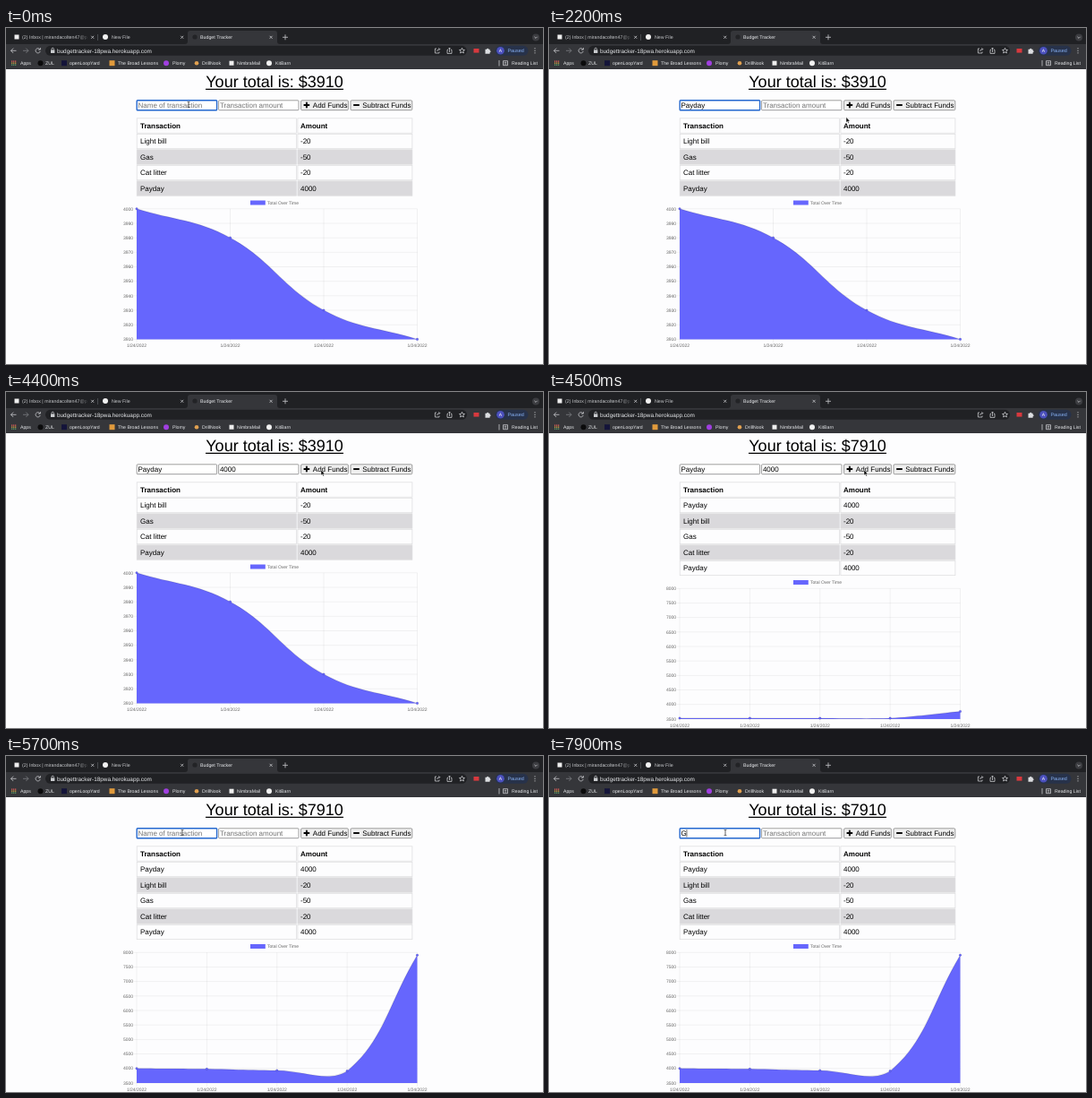
An HTML page for the animation above (8 s loop, 600 px wide and 375 px high).

```html
<!DOCTYPE html>
<html lang="en">
<head>
<meta charset="utf-8">
<title>Budget Tracker</title>
<style>
  html, body { margin: 0; width: 100%; height: 100%; overflow: hidden; background: #fdfdfe; }
  svg { display: block; width: 100vw; height: 100vh; }
  text { font: 8px "Liberation Sans", Arial, sans-serif; text-rendering: geometricPrecision; }
  .tab text { font-size: 5.3px; fill: #c6c8cb; }
  .bookmarks text { font-size: 5.2px; fill: #e8eaed; }
  .icons { fill: none; stroke: #c9cbce; stroke-width: .8; }
  text.total { font-size: 18px; text-anchor: middle; }
  text.bold { font-weight: bold; }
  text.hint { fill: #757575; }
  text.tick { font-size: 5px; fill: #666; }
  text.end { text-anchor: end; }
  text.mid { text-anchor: middle; }
</style>
</head>
<body>
<svg viewBox="0 0 600 375">
  <defs>
    <linearGradient id="fade" gradientUnits="userSpaceOnUse" x1="80" x2="92">
      <stop stop-color="#c6c8cb"/><stop offset="1" stop-color="#c6c8cb" stop-opacity=".1"/>
    </linearGradient>
  </defs>

  <path fill="#202124" d="M0 0H600V20H0Z"/>
  <path fill="#35363a" d="M0 18H200Q203 18 203 15V6Q203 3 206 3H300Q303 3 303 6V15Q303 18 306 18H600V46H0Z"/>
  <g class="tab">
    <rect x="9.5" y="7.5" width="5" height="5" fill="#eee"/>
    <text x="18" y="12" style="fill:url(#fade)">(2) Inbox | mirandacolten47@p</text>
    <circle cx="111" cy="10" r="3" fill="#f1f1f1"/>
    <text x="118" y="12">New File</text>
    <circle cx="211" cy="10" r="2.6" fill="#222326"/>
    <text x="217" y="12" style="fill:#e8eaed">Budget Tracker</text>
  </g>
  <circle cx="592" cy="10.5" r="4" fill="#3c3d41"/>
  <g class="icons">
    <path d="M95.2 8.8l3 3m0-3l-3 3M195.2 8.8l3 3m0-3l-3 3M294.6 8.8l3 3m0-3l-3 3M309 10.3h6m-3-3v6M590.4 9.8l1.6 1.6 1.6-1.6"/>
    <path stroke="#55575b" d="M102.5 7v7"/>
    <path d="M11.5 25.3h-6m2.7-2.7l-2.7 2.7 2.7 2.7"/>
    <path stroke="#7d7f83" d="M19 25.3h6m-2.7-2.7l2.7 2.7-2.7 2.7"/>
    <path d="M37.8 23.8a2.6 2.6 0 1 0 .4 2.2M38.4 22v2.2h-2.2"/>
  </g>
  <rect x="44" y="19.8" width="471" height="11" rx="5.5" fill="#202124"/>
  <path fill="#c9cbce" d="M50 24.4h4.4v3.6H50z"/>
  <text x="57" y="27.5" style="font-size:6.4px;fill:#e8eaed">budgettracker-18pwa.herokuapp.com</text>
  <g class="icons">
    <path d="M51 24.4v-1a1.2 1.2 0 0 1 2.4 0v1M481 23h-1.6v5h4.6v-1.5M481.5 26q.3-2.4 3.2-2.4m-1.2-1.3l1.3 1.3-1.3 1.3M494 24.4h-1v4h5v-4h-1M495.500 27v-5m-1.300 1.400l1.300-1.400 1.300 1.400"/>
    <path d="M509.500 22.300l.9 2 2.100.2-1.600 1.400.5 2.100-1.900-1.100-1.900 1.100.5-2.100-1.600-1.400 2.100-.2z"/>
  </g>
  <path fill="#d8393e" d="M522.500 23h6v4.600h-6z"/>
  <path fill="#dcdee1" d="M535.500 23.800h1.700a1 1 0 0 1 2 0h1.400v1.500a1 1 0 0 1 0 2v1.400h-5.100z"/>
  <rect x="546.5" y="19.800" width="37" height="11" rx="5.500" fill="#27324a"/>
  <circle cx="552.500" cy="25.300" r="4.300" fill="#4b50bd"/>
  <text class="mid" x="552.500" y="27.200" style="font-size:5px;fill:#fff">A</text>
  <text x="560.500" y="27.200" style="font-size:5.400px;fill:#8ab4f8">Paused</text>
  <path stroke="#d0d2d5" stroke-width="1.200" stroke-linecap="round" d="M591 22.800h0M591 25.300h0M591 27.800h0"/>

  <g class="bookmarks">
    <path stroke="#e2605b" stroke-width="1.300" stroke-dasharray="1.300 .7" d="M6 37.200h5.500"/>
    <path stroke="#d9a548" stroke-width="1.300" stroke-dasharray="1.300 .7" d="M6 39.200h5.500"/>
    <path stroke="#61a56d" stroke-width="1.300" stroke-dasharray="1.300 .7" d="M6 41.200h5.500"/>
    <circle cx="38.500" cy="39.200" r="3" fill="#0b0b0c"/>
    <rect x="62" y="36.200" width="6" height="6" fill="#14143a"/>
    <rect x="115.500" y="36.200" width="6" height="6" fill="#e09a3c"/>
    <circle cx="179" cy="39.200" r="3" fill="#a03fe0"/>
    <circle cx="213" cy="39.200" r="2.300" fill="#e0a050"/>
    <rect x="249.500" y="36.700" width="5" height="5" fill="#eee"/>
    <circle cx="294" cy="39.200" r="3" fill="#f1f1f1"/>
    <text x="16" y="41">Apps</text>
    <text x="44" y="41">ZUL</text>
    <text x="71" y="41">openLoopYard</text>
    <text x="125" y="41">The Broad Lessons</text>
    <text x="186" y="41">Plomy</text>
    <text x="219" y="41">DrillNook</text>
    <text x="258" y="41">NimbraMail</text>
    <text x="301" y="41">KitBarn</text>
    <text x="565" y="41">Reading List</text>
    <path class="icons" d="M551 36v6.500M555.500 36.700h5v5h-5zM556.700 38.300h2.600M556.700 40h2.600"/>
  </g>
  <g id="page"></g>
</svg>

<script>
const LOOP = 8000, STEP = 100, ADDED = 4485;
const page = document.getElementById('page');
const pen = document.createElement('canvas').getContext('2d');
pen.font = '8px "Liberation Sans", Arial, sans-serif';

// time, focused field, name, amount
const edits = [
  [-500, 'name', '', ''],
  [700, 'name', 'P', ''],
  [900, 'name', 'Pa', ''],
  [1100, 'name', 'Pay', ''],
  [1300, 'name', 'Payd', ''],
  [1500, 'name', 'Payda', ''],
  [1600, 'name', 'Payday', ''],
  [2800, 'amount', 'Payday', ''],
  [3300, 'amount', 'Payday', '4'],
  [3500, 'amount', 'Payday', '40'],
  [3600, 'amount', 'Payday', '400'],
  [3700, 'amount', 'Payday', '4000'],
  [4200, '', 'Payday', '4000'],
  [4600, '', '', ''],
  [5200, 'name', '', ''],
  [7900, 'name', 'G', '']
];

// time, x, y
const mouse = [
  [0, 204, 85.5], [1700, 204, 85.5], [2200, 332, 99.5], [2700, 295, 90], [3700, 295, 90],
  [4000, 352, 87], [4500, 352, 87], [4800, 220, 94], [5200, 197, 85.5], [LOOP, 197, 85.5]
];

const mix = (a, b, k) => a + (b - a) * k;
const rect = (x, y, w, h, attrs) => `<rect x="${x}" y="${y}" width="${w}" height="${h}" ${attrs}/>`;
const path = (d, attrs) => `<path d="${d}" ${attrs}/>`;
const text = (x, y, value, cls = '') => `<text x="${x}" y="${y}" class="${cls}">${value}</text>`;

function field(x, value, hint, focused, caret) {
  const ring = focused ? 'stroke="#2468cf" stroke-width="1.4"' : 'stroke="#767676" stroke-width=".7"';
  let out = rect(x, 80.8, 89.4, 10.9, `rx=".8" fill="#fff" ${ring}`);
  out += text(x + 1.3, 89, value || hint, value ? '' : 'hint');
  if (focused && caret) {
    const end = x + 1.5 + pen.measureText(value).width;
    out += path(`M${end} 82.2V90.5`, 'stroke="#000" stroke-width=".6"');
  }
  return out;
}

function button(x, w, icon, label) {
  return rect(x, 80.8, w, 10.9, 'rx="1.2" fill="#efefef" stroke="#767676" stroke-width=".7"') +
    path(icon, 'stroke="#000" stroke-width="1.9"') + text(x + 13.2, 89, label);
}

function table(rows) {
  return [['Transaction', 'Amount'], ...rows].map(([name, amount], i) => {
    const y = 109 + 17.5 * i;
    const look = `fill="${i && i % 2 === 0 ? '#dad9dc' : '#fdfdfe'}" stroke="#dcdcde" stroke-width=".7"`;
    return rect(146.2, y - 8.2, 178.2, 16.4, look) + rect(325.9, y - 8.2, 128, 16.4, look) +
      text(150, y + 2.9, name, i ? '' : 'bold') + text(329, y + 2.9, amount, i ? '' : 'bold');
  }).join('');
}

// Knots with their handles between: p0, after0, before1, p1, ...
function spline(points, top, bottom) {
  return points.flatMap((p, i) => {
    const a = points[i - 1] || p, b = points[i + 1] || p;
    const before = Math.hypot(p[0] - a[0], p[1] - a[1]);
    const after = Math.hypot(b[0] - p[0], b[1] - p[1]);
    const handle = d => {
      const k = 0.4 * d / (before + after);
      const y = p[1] + k * (b[1] - a[1]);
      return [p[0] + k * (b[0] - a[0]), Math.min(bottom, Math.max(top, y))];
    };
    return [handle(-before), p, handle(after)];
  }).slice(1, -1);
}

function chart(values, min, step, top, grow) {
  const left = 146, right = 459.5, height = 145.6, bottom = top + height;
  const xs = values.map((_, i) => mix(left, right, i / (values.length - 1)));
  let grid = '';
  let out = rect(273, top - 9.3, 16.8, 5, 'fill="#6666fd"') + text(292, top - 5, 'Total Over Time', 'tick');
  for (let i = 0; i < 10; i++) {
    const y = bottom - height * i / 9;
    grid += `M142.500 ${y}H${right}`;
    out += text(142, y + 1.7, min + step * i, 'tick end');
  }
  for (const x of xs) {
    grid += `M${x} ${top}V${bottom + 4}`;
    out += text(x, bottom + 8.6, '1/24/2022', 'tick mid');
  }
  out += path(grid, 'stroke="#000" stroke-opacity=".1" stroke-width=".5"');

  const flat = spline(xs.map(x => [x, bottom]), top, bottom);
  const full = spline(xs.map((x, i) => [x, bottom - (values[i] - min) / (step * 9) * height]), top, bottom);
  const curve = full.map((p, i) => p.map((v, axis) => mix(flat[i][axis], v, grow)));
  const line = `M${curve[0]}C${curve.slice(1).join(' ')}`;
  out += path(`${line}V${bottom}H${left}Z`, 'fill="#6666fd"');
  out += path(line, 'fill="none" stroke="#000" stroke-opacity=".1" stroke-width="1.25"');
  for (const [x, y] of curve.filter((_, i) => i % 3 === 0))
    out += `<circle cx="${x}" cy="${y}" r="1.300" fill="#6666fd" stroke="#000" stroke-opacity=".2" stroke-width=".5"/>`;
  return out;
}

function pointer(t) {
  const i = mouse.findIndex(m => m[0] > t);
  const [t0, x0, y0] = mouse[i - 1], [t1, x1, y1] = mouse[i];
  const k = (t - t0) / (t1 - t0), ease = k * k * (3 - 2 * k);
  const x = mix(x0, x1, ease), y = mix(y0, y1, ease);
  const overField = y > 80 && y < 92 && x > 146 && x < 327;
  return `<g transform="translate(${x} ${y})">` + (overField
    ? path('M-1.400-3.200Q0-3.200 0-2.300Q0-3.200 1.400-3.200M0-2.300V2.300M-1.400 3.200Q0 3.200 0 2.300Q0 3.200 1.400 3.200', 'fill="none" stroke="#222" stroke-width=".7"')
    : path('M0 0V6L1.400 4.800 2.400 7 3.400 6.500 2.500 4.400H4.300Z', 'fill="#000" stroke="#fff" stroke-width=".5"')) + '</g>';
}

function render(t) {
  const [since, focus, name, amount] = edits.filter(e => e[0] <= t).pop();
  const caret = Math.floor((t - since) / 500) % 2 === 0;
  const added = t >= ADDED;
  const rows = [['Light bill', -20], ['Gas', -50], ['Cat litter', -20], ['Payday', 4000]];
  if (added) rows.unshift(['Payday', 4000]);
  const grow = 1 - (1 - Math.min(1, (t - ADDED) / 1000)) ** 4;

  page.innerHTML =
    text(300, 65.800, `Your total is: $${added ? 7910 : 3910}`, 'total') +
    path('M223 68.300H377', 'stroke="#000" stroke-width="1.200"') +
    field(146.200, name, 'Name of transaction', focus === 'name', caret) +
    field(237.600, amount, 'Transaction amount', focus === 'amount', caret) +
    (focus === 'amount' ? path('M320.800 85.300l1.500-2 1.500 2zM320.800 87.200l1.500 2 1.500-2z', 'fill="#555"') : '') +
    button(329.600, 52.800, 'M332.600 86H339.200M335.900 82.700V89.300', 'Add Funds') +
    button(385, 68.800, 'M388.200 86H394.800', 'Subtract Funds') +
    table(rows) +
    (added ? chart([4000, 3980, 3930, 3910, 7910], 3500, 500, 219.300, grow)
           : chart([4000, 3980, 3930, 3910], 3910, 10, 201.800, 1)) +
    pointer(t);
}

let shown = -1;
function tick(now) {
  const t = Math.floor(now % LOOP / STEP) * STEP;
  if (t !== shown) render(shown = t);
  requestAnimationFrame(tick);
}
render(0);
requestAnimationFrame(tick);
</script>
</body>
</html>
```
